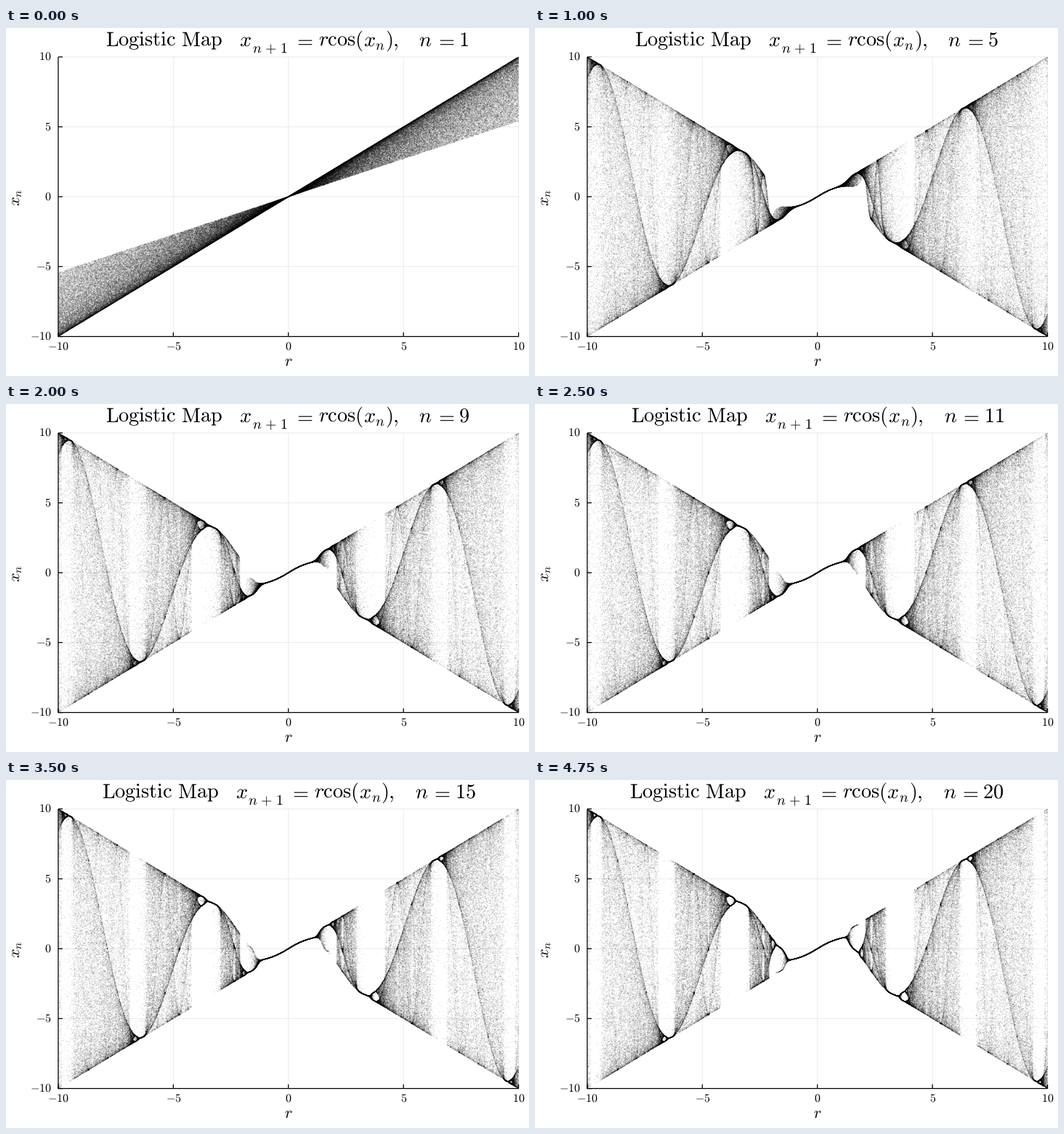
Animation of 720 by 479 pixels, one loop 5000 ms. Source, as a matplotlib script:

```python
import numpy as np
import matplotlib.pyplot as plt
from matplotlib.animation import FuncAnimation

W, H, DPI = 720, 479, 64
LEFT, RIGHT, TOP, BOTTOM = 72, 706, 40, 425
COLS, ROWS = RIGHT - LEFT, BOTTOM - TOP
STEPS, POINTS, INK = 20, 160_000, 0.17
PT = 72 / DPI  # points per pixel

plt.rcParams.update({"mathtext.fontset": "cm", "text.hinting": "none"})

fig = plt.figure(figsize=(W / DPI, H / DPI), dpi=DPI, facecolor="white")
ax = fig.add_axes([0, 0, 1, 1])


def px(r):
    return LEFT - 0.1 + (r + 10) / 20 * (RIGHT - 0.3 - LEFT)


def py(x):
    return BOTTOM - 0.4 - (x + 10) / 20 * (BOTTOM - 0.2 - TOP)


def line(xs, ys, color="black", width=1.25, z=3):
    ax.plot(xs, ys, color=color, lw=width * PT, zorder=z, snap=False,
            solid_capstyle="butt")


def math(x, y, s, size, ha="left", **kw):
    return ax.text(x, y, f"${s}$", fontsize=size * PT, ha=ha,
                   va="baseline", **kw)


def density(r, x):
    """Spread every point over its four nearest pixels."""
    u, v = px(r) - LEFT - 0.5, py(x) - TOP - 0.5
    i, j = np.floor(u).astype(int), np.floor(v).astype(int)
    fu, fv = u - i, v - j
    total = np.zeros((ROWS + 2) * (COLS + 2))
    for di, wu in ((0, 1 - fu), (1, fu)):
        for dj, wv in ((0, 1 - fv), (1, fv)):
            cell = (j + dj + 1) * (COLS + 2) + i + di + 1
            total += np.bincount(cell, wu * wv, minlength=total.size)
    return total.reshape(ROWS + 2, COLS + 2)[1:-1, 1:-1]


# Orbits of all points, one array per step
rng = np.random.default_rng(7)
r = rng.uniform(-10, 10, POINTS)
orbit = [rng.uniform(0, 1, POINTS)]
for _ in range(STEPS):
    orbit.append(r * np.cos(orbit[-1]))

cloud = np.zeros((ROWS, COLS, 4))
image = ax.imshow(cloud, extent=(LEFT, RIGHT, BOTTOM, TOP), aspect="auto",
                  interpolation="nearest", zorder=2)

# Grid, ticks and axis lines
for t in (-10, -5, 0, 5, 10):
    x, y = px(t), py(t)
    line([x, x], [TOP, BOTTOM], "#ebebeb", 1, 1)
    line([LEFT, RIGHT], [y, y], "#ebebeb", 1, 1)
    line([x, x], [BOTTOM - 6, BOTTOM])
    line([LEFT, LEFT + 6], [y, y])
    math(x, 444, t, 16, "center")
    math(62.5, y + 5.3, t, 16, "right")
line([px(-10)] * 2, [TOP, BOTTOM])
line([LEFT - 0.6, RIGHT], [py(-10)] * 2)

math(388.5, 465, "r", 22, "center")
side = dict(rotation=90, rotation_mode="anchor")
math(18.5, 245, "x", 22, **side)
math(22, 232.5, "n", 15.4, **side)

# Title pieces: x, baseline, text, size, alignment
BIG, SUB, BASE, LOW = 28.3, 19.8, 25, 34
pieces = [
    (137, BASE, r"\mathrm{Logistic\ Map}", BIG, "left"),
    (321, BASE, "x", BIG, "left"),
    (338.6, LOW, "n", SUB, "left"),
    (363.7, LOW, "+", SUB, "center"),
    (376.9, LOW, "1", SUB, "left"),
    (409.6, BASE, "=", BIG, "center"),
    (430, BASE, r"r\mathrm{cos}(", BIG, "left"),
    (491.5, BASE, "x", BIG, "left"),
    (508.3, 29.3, "n", SUB, "left"),
    (522, BASE, "),", BIG, "left"),
    (568.5, BASE, "n", BIG, "left"),
    (604.6, BASE, "=", BIG, "center"),
    (623.4, BASE, "1", BIG, "left"),
]
title = [math(*p) for p in pieces]

ax.set_xlim(0, W)
ax.set_ylim(H, 0)
ax.axis("off")


def draw(frame):
    n = frame + 1
    cloud[..., 3] = 1 - np.exp(-INK * density(r, orbit[n]))
    image.set_data(cloud)
    shift = 0 if n < 10 else -5.5 if n < 20 else -7
    for part, p in zip(title, pieces):
        part.set_x(p[0] + shift)
    title[-1].set_text(f"${n}$")
    return [image, *title]


anim = FuncAnimation(fig, draw, frames=STEPS, interval=250,
                     init_func=lambda: draw(0), repeat=True, repeat_delay=0)
plt.show()
```
